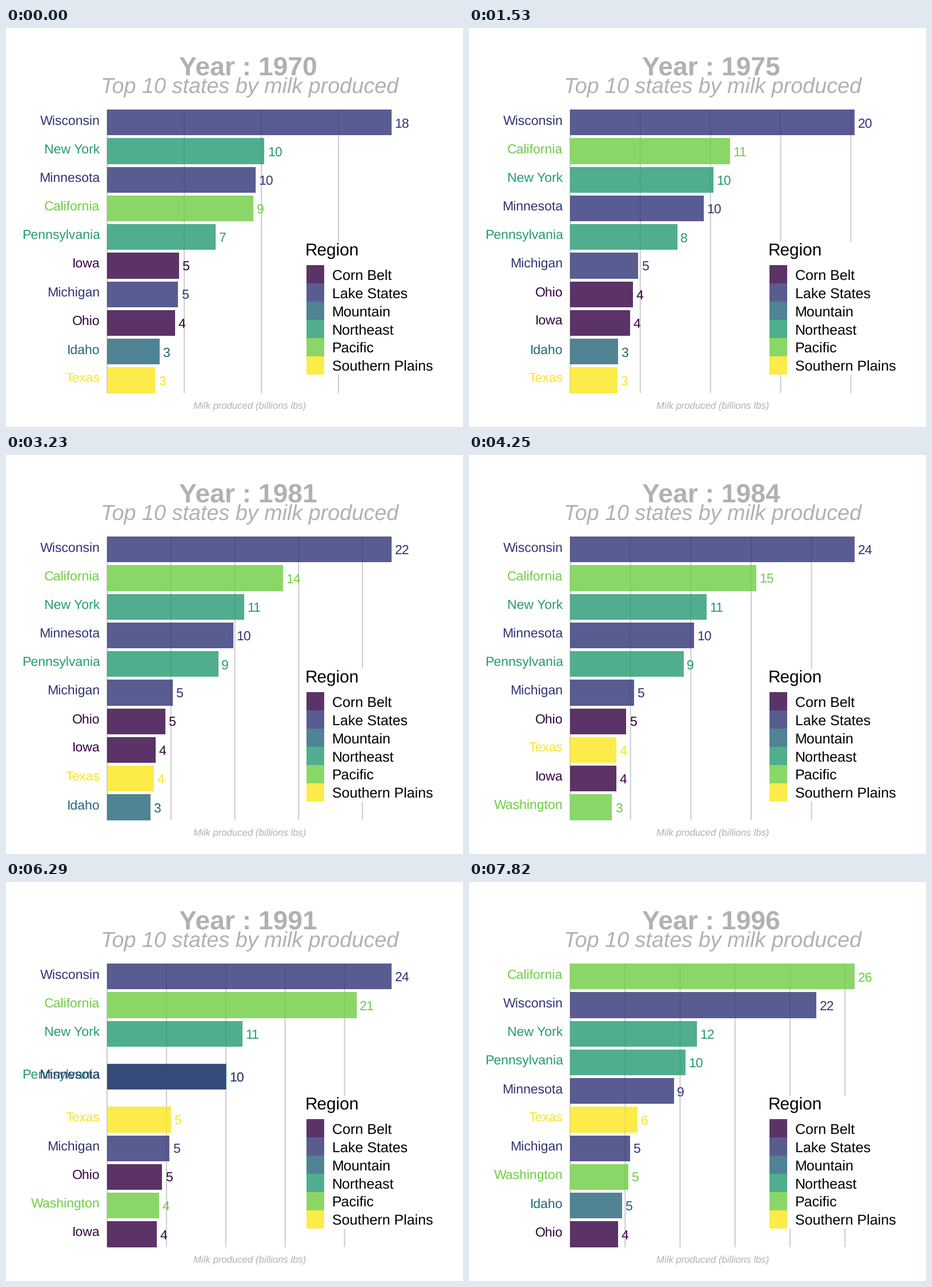
A matplotlib script that plays this animation: 800 by 700 pixels, repeating every 7.99 s.

```python
import matplotlib.pyplot as plt
import numpy as np
from matplotlib.animation import FuncAnimation
from matplotlib.patches import Rectangle

W, H, DPI = 800, 700, 100
PT = 72 / DPI                   # points per pixel
plt.rcParams["font.family"] = "Liberation Sans"
plt.rcParams["text.hinting"] = "none"

LEFT, RIGHT = 177, 675          # panel edges
TOP, PITCH, BAR = 143.05, 50.25, 45.3
FIRST, LAST = 1970, 1996
GREY = "#b1b1b1"

REGIONS = {
    "Corn Belt": "#330040",
    "Lake States": "#303376",
    "Mountain": "#24647a",
    "Northeast": "#249a72",
    "Pacific": "#6dce41",
    "Southern Plains": "#fde61d",
}

# turning points of each state's output: (year - 1900, billions of lbs)
STATES = {
    "Wisconsin": ("Lake States", (70, 18.44), (88, 25.03), (91, 23.75), (96, 22.39)),
    "California": ("Pacific", (70, 9.48), (77, 12.15), (85, 15.9), (91, 21.48),
                   (96, 25.87)),
    "New York": ("Northeast", (77, 10.2), (84, 11.3), (96, 11.51)),
    "Minnesota": ("Lake States", (70, 9.63), (77, 9.47), (86, 10.5), (96, 9.45)),
    "Pennsylvania": ("Northeast", (72, 7.04), (88, 10.2), (90, 10.02), (96, 10.48)),
    "Iowa": ("Corn Belt", (70, 4.65), (82, 3.7), (90, 4.23), (96, 3.85)),
    "Michigan": ("Lake States", (70, 4.6), (84, 5.3), (89, 5.2), (96, 5.45)),
    "Ohio": ("Corn Belt", (70, 4.41), (72, 4.56), (77, 4.44), (88, 4.77), (96, 4.36)),
    "Texas": ("Southern Plains", (70, 3.12), (84, 3.85), (91, 5.49), (96, 6.13)),
    "Missouri": ("Corn Belt", (70, 3.02), (96, 2.65)),
    "Washington": ("Pacific", (77, 2.6), (88, 3.97), (96, 5.3)),
    "Idaho": ("Mountain", (93, 3.4), (96, 4.73)),
}


def timeline():
    """Years to show: a halfway step before each year, skipped every 4.3 years."""
    years = [FIRST]
    for n in range(1, LAST - FIRST + 1):
        if n // 4.3 == (n - 1) // 4.3:
            years.append(FIRST + n - 0.5)
        years.append(FIRST + n)
    return years


def top_ten(year):
    """State -> (rank, value), best first."""
    vals = {s: np.interp(year - 1900, *zip(*pts)) for s, (_, *pts) in STATES.items()}
    best = sorted(vals, key=vals.get, reverse=True)[:10]
    return {s: (i, vals[s]) for i, s in enumerate(best)}


YEARS = timeline()
fig = plt.figure(figsize=(W / DPI, H / DPI), dpi=DPI, facecolor="white")
ax = fig.add_axes([0, 0, 1, 1])


def text(x, y, s, size, **kw):
    ax.text(x, y, s, fontsize=size * PT, va="baseline", **kw)


def box(x, y, w, h, color, **kw):
    ax.add_patch(Rectangle((x, y), w, h, facecolor=color, lw=0, **kw))


def grid(peak, scale):
    for g in np.arange(0, peak, 5):
        x = LEFT + g * scale
        ax.plot([x, x], [TOP, TOP + 9 * PITCH + BAR], color="#cecece", lw=2.1 * PT,
                solid_capstyle="butt", snap=False, zorder=1)


def legend():
    box(525, 375, 224, 233, "white", zorder=5)
    text(523.3, 399, "Region", 29.8, color="black", zorder=6)
    for i, (name, color) in enumerate(REGIONS.items()):
        y = 416 + 32 * i
        box(526, y, 31, 32, color, alpha=0.8, zorder=6)
        text(570.7, y + 26 - 0.2 * i, name, 25, color="black", zorder=6)


def draw(k):
    ax.clear()
    ax.set(xlim=(0, W), ylim=(H, 0))
    ax.axis("off")

    year = int(np.ceil(YEARS[k]))
    start, end = top_ten(int(YEARS[k])), top_ten(year)
    # states that enter or leave are absent from halfway steps
    rows = {s: np.add(start[s], end[s]) / 2 for s in end if s in start}

    peak = max(val for _, val in rows.values())
    scale = (RIGHT - LEFT) / peak
    grid(peak, scale)

    for i, (s, (rank, val)) in enumerate(rows.items()):
        color = REGIONS[STATES[s][0]]
        y, w, z = TOP + PITCH * rank, val * scale, i / 100
        box(LEFT, y, w, BAR, color, alpha=0.8, zorder=2 + z)
        text(164.5, y + 26.3, s, 23, color=color, ha="right", zorder=3 + z)
        text(LEFT + w + 5.5, y + 31.3, str(round(end[s][1])), 23, color=color,
             zorder=4 + z)

    text(303, 82.5, f"Year : {year}", 46.3, color=GREY, weight="bold")
    text(166, 114.5, "Top 10 states by milk produced", 37.7, color=GREY,
         style="italic")
    text(328.5, 667, "Milk produced (billions lbs)", 16.7, color=GREY,
         style="italic")
    legend()


anim = FuncAnimation(fig, draw, frames=len(YEARS), init_func=lambda: None,
                     interval=170, repeat=True)
plt.show()
```
